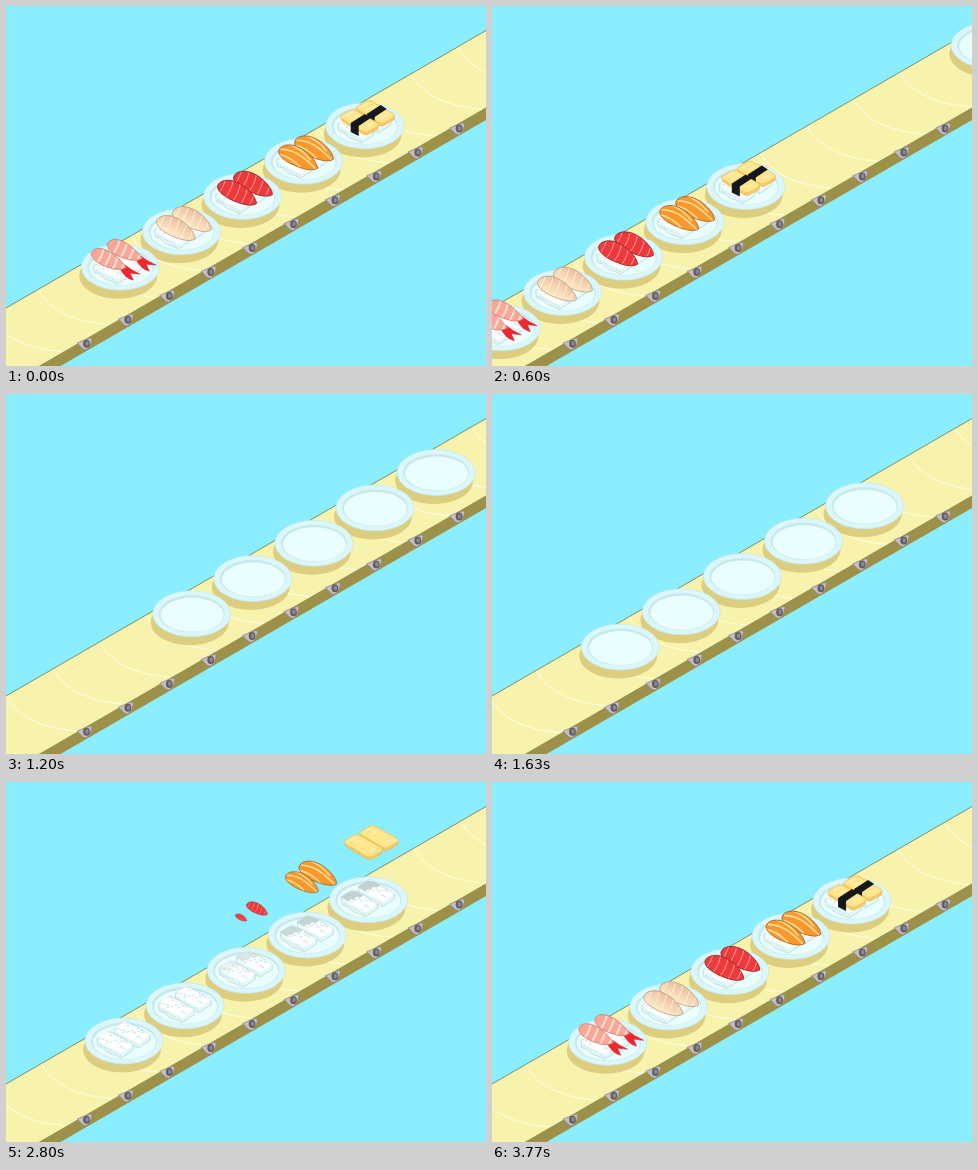
Recreate the animation shown at these times as an HTML page with a canvas. Size 480x360 px, loop 3.81 s.

```html
<!DOCTYPE html>
<html lang="en">
<head>
<meta charset="utf-8">
<title>Sushi belt</title>
<style>
html, body { margin: 0; width: 100%; height: 100%; overflow: hidden; background: #8beeff; }
canvas { display: block; }
</style>
</head>
<body>
<canvas id="stage" width="480" height="360"></canvas>
<script>
const ctx = document.getElementById('stage').getContext('2d');
const LOOP = 3810, MOVE_START = -200, MOVE_TIME = 2200;
const SLOPE = 0.578, PITCH = 61.1, GROUP = PITCH * 8, LINE_GAP = 46.6;
const LAG = 55, STAGGER = 100, HOVER = 49;

const clamp = v => Math.max(0, Math.min(1, v));
const progress = (t, start, length) => clamp((t - start) / length);
const smooth = u => u * u * (3 - 2 * u);
const pop = u => 1 - (1 - u) ** 1.5;

// Cubic bezier timing with control points (.647, 0) and (.743, 1).
function beltEase(x) {
  let low = 0, high = 1;
  for (let i = 0; i < 24; i++) {
    const s = (low + high) / 2, r = 1 - s;
    if (3 * s * r * r * 0.647 + 3 * s * s * r * 0.257 + s ** 3 < x) low = s; else high = s;
  }
  return smooth(low);
}

function paint(path, fill, stroke, width = 0.8) {
  if (fill) { ctx.fillStyle = fill; ctx.fill(path); }
  if (stroke) { ctx.strokeStyle = stroke; ctx.lineWidth = width; ctx.stroke(path); }
}

function polygon(...points) {
  const path = new Path2D();
  points.forEach(([x, y]) => path.lineTo(x, y));
  path.closePath();
  return path;
}

function ellipse(x, y, rx, ry, fill, stroke, width) {
  const path = new Path2D();
  path.ellipse(x, y, rx, ry, 0, 0, Math.PI * 2);
  paint(path, fill, stroke, width);
}

function at(x, y, scaleX, scaleY, draw) {
  if (scaleX <= 0.01) return;
  ctx.save();
  ctx.translate(x, y);
  ctx.scale(scaleX, scaleY);
  draw();
  ctx.restore();
}

const beltTop = polygon([0, 302], [480, 24.5], [480, 101.5], [0, 379]);
const beltSide = polygon([0, 379], [480, 101.5], [480, 114], [0, 391.5]);
const beltLine = new Path2D('M0 0Q18 31 71 35');
const bracket = new Path2D('M-8 -1L5 -6L7 -5Q6 3 1 6L-2 5Z');

function drawBelt(p) {
  paint(beltTop, '#f7f3ad');
  ctx.save();
  ctx.clip(beltTop);
  const first = 35 - (p * LINE_GAP * 9) % LINE_GAP;
  for (let i = -3; i < 12; i++) {
    const x = first + i * LINE_GAP;
    at(x, 302 - SLOPE * x, 1, 1, () => paint(beltLine, null, 'rgba(255,255,240,.8)', 1));
  }
  ctx.restore();
  paint(beltSide, '#9d9048');
  paint(new Path2D('M0 302L480 24.5'), null, '#77734f', 0.8);
  for (let i = 0; i < 10; i++) {
    at(79 + i * 41.4, 338 - i * 23.9, 1, 1, () => {
      paint(bracket, '#c6bec5', '#8d858c', 0.7);
      ellipse(1.5, -0.3, 3.4, 4, '#625d64');
      ellipse(2, -0.5, 1.7, 2.4, '#8d8790');
    });
  }
}

function drawPlate() {
  ellipse(-2, 8.5, 39, 23, '#dccd7f');
  ellipse(0, 0, 39, 23, '#dcf7fb', '#c5e8ec', 0.7);
  ellipse(0, 0, 33, 18.5, '#c6e9eb');
  ellipse(0.5, 1, 31.5, 17, '#eafdff');
}

const riceTop = polygon([-18, -5], [-13, -9], [-6, -13], [-1, -9], [5, -7], [11, -3], [18, 1], [13, 5], [6, 9], [1, 6], [-6, 3], [-12, -1]);
const riceBody = polygon([-18, -5], [-6, -13], [5, -7], [18, 1], [18, 6], [12, 10], [6, 14], [0, 11], [-6, 9], [-12, 4], [-17, 2]);
const riceGrains = new Path2D();
for (let i = 0; i < 15; i++) {
  const u = (i * 0.618) % 1 * 2 - 1, v = (i * 0.382 + 0.13 * i * i) % 1 * 2 - 1;
  const x = u * 11 + v * 5, y = u * 6 - v * 3.5 - 2;
  riceGrains.moveTo(x - 1.4, y);
  riceGrains.quadraticCurveTo(x, y - 1.8, x + 1.5, y + (i % 3 - 1));
}
for (let i = 0; i < 7; i++) {
  riceGrains.moveTo(-15 + i * 3.2, 0 + i * 1.8);
  riceGrains.lineTo(-13 + i * 3.2, 2.4 + i * 1.6);
}
const riceShade = new Path2D('M-19 -6L-9 -12Q-3 -12 4 -7L0 -5L-3 -6L-6 -3L-9 -4L-11 -1Z');

function drawRice(shade) {
  paint(riceBody, '#e8f8f8', '#a9d2d2', 0.7);
  paint(riceTop, '#fff');
  paint(riceGrains, null, '#b2d9d8', 0.8);
  ctx.globalAlpha = shade;
  paint(riceShade, '#c2d2d3');
  ctx.globalAlpha = 1;
}

const slice = new Path2D('M-20 -6C-19 -12 -9 -15 2 -9C11 -4 18 4 19 11C13 15 2 11 -7 7C-14 3 -20 -1 -20 -6Z');
const crossGrain = new Path2D();
for (let i = 0; i < 5; i++) {
  const x = -15 + i * 7, y = -12 + i * 4;
  crossGrain.moveTo(x + 4, y - 5);
  crossGrain.quadraticCurveTo(x + 2, y + 6, x - 5, y + 14);
}
const longGrain = new Path2D('M-18 -8Q-6 -8 4 0T18 13M-10 -13Q3 -9 12 3M-20 -3Q-9 -1 2 10');

const shrimpBody = new Path2D('M-24 -9C-23 -16 -14 -16 -7 -12C1 -8 6 -2 11 4C7 7 0 7 -7 4C-15 2 -23 -3 -24 -9Z');
const shrimpTail = new Path2D('M4 4L10 2Q16 7 25 11L15 10L18 17Q9 15 4 4Z');

function drawTexture(shape, grain, color, width) {
  ctx.save();
  ctx.clip(shape);
  paint(grain, null, color, width);
  ctx.restore();
}

function drawSlice(fill, grain, stripe, width, outline) {
  paint(slice, fill);
  drawTexture(slice, grain, stripe, width);
  paint(slice, null, outline, 0.9);
}

function drawShrimp() {
  paint(shrimpTail, '#ee2630', '#c92c32', 0.5);
  paint(shrimpBody, '#f9a797');
  drawTexture(shrimpBody, crossGrain, '#fedfd5', 2);
  paint(shrimpBody, null, '#d9766b', 0.8);
}

function drawWhiteFish() {
  const blush = ctx.createLinearGradient(-5, 7, 3, -8);
  blush.addColorStop(0, '#fcebc6');
  blush.addColorStop(1, '#ecbf9f');
  drawSlice(blush, crossGrain, '#fdeeda', 1, '#c0a38c');
}

const omeletTop = new Path2D('M-19 -6L-9 -12Q-6 -13 -3 -11L18 1Q20 3 17 5L8 10Q5 11 2 9L-18 -3Q-20 -4 -19 -6Z');
const omeletSide = new Path2D('M-19 -5L-18 -1L3 12Q6 14 9 12L18 7L19 3L8 9Q5 10 2 8Z');
const nori = polygon([-9, 1], [5, -8], [11, -4], [-1, 4], [-1, 14], [-9, 10]);

function drawOmelet() {
  paint(omeletSide, '#fbcd62', '#dfae48', 0.6);
  paint(omeletTop, '#ffe68d', '#e8bb54', 0.7);
  paint(new Path2D('M-14 -6L-7 -10M-9 -3L-1 -7M5 5L13 1'), null, '#fff3bd', 1.3);
}

const toppings = [
  drawOmelet,
  () => drawSlice('#fa992b', longGrain, '#ffdc98', 1.6, '#a9662a'),
  () => drawSlice('#ee3a3c', crossGrain, '#ffaaa0', 0.9, '#95282a'),
  drawWhiteFish,
  drawShrimp
];

function drawDish(order, age, x, y) {
  at(x, y, 1, 1, drawPlate);
  const delay = order * STAGGER;
  const pieces = [
    { rice: [8, -7], top: [11, -13], lag: 0 },
    { rice: [-9, 3], top: [-5, -4], lag: LAG }
  ].map(({ rice, top, lag }) => {
    const drop = progress(age, 3025 + delay + lag, 150);
    return {
      riceX: x + rice[0],
      riceY: y + rice[1],
      riceSize: pop(progress(age, 2070 + delay + lag, 230)),
      topX: x + top[0],
      topY: y + top[1] - HOVER * (1 - smooth(drop)),
      topSize: pop(progress(age, 2520 + delay + lag * 0.7, 200)),
      squash: 1 - 0.16 * Math.sin(drop * Math.PI),
      landed: drop === 1,
      wrap: order === 0 ? pop(progress(age, 3240 + lag, 150)) : 0
    };
  });
  for (const p of pieces) {
    at(p.riceX, p.riceY, p.riceSize, p.riceSize, () => drawRice(p.landed ? 0 : p.topSize));
  }
  for (const p of pieces) {
    at(p.topX, p.topY, p.topSize, p.topSize * p.squash, toppings[order]);
    at(p.topX, p.topY, p.wrap, p.wrap, () => paint(nori, '#15171a'));
  }
}

function drawGroup(age, offset) {
  for (let order = 0; order < 5; order++) {
    const along = (4 - order) * PITCH + offset;
    const x = 118 + along;
    if (x > -60 && x < 540) drawDish(order, age, x, 259 - along * SLOPE);
  }
}

function render(now) {
  const t = (now % LOOP - MOVE_START) % LOOP + MOVE_START;
  const p = beltEase(progress(t, MOVE_START, MOVE_TIME));
  ctx.fillStyle = '#8beeff';
  ctx.fillRect(0, 0, 480, 360);
  drawBelt(p);
  drawGroup(t, GROUP * (1 - p));
  drawGroup(t + LOOP, -GROUP * p);
}

const began = performance.now();
function frame() {
  render(performance.now() - began);
  requestAnimationFrame(frame);
}
frame();
</script>
</body>
</html>
```
